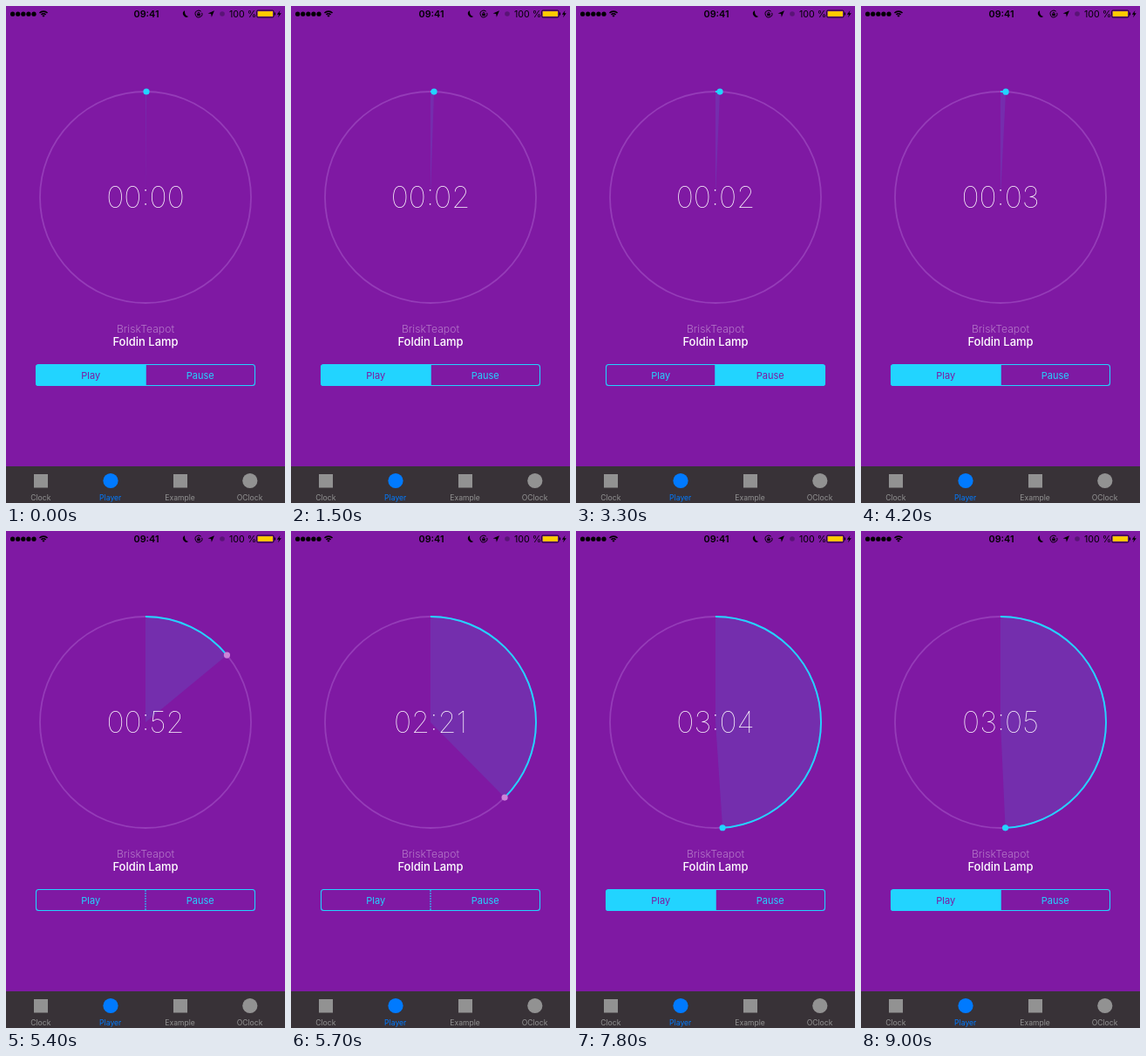
Animation of 320 by 569 pixels, one loop 9.1 s. Source, as an HTML page with a canvas:

```html
<!DOCTYPE html>
<html lang="en">
<head>
<meta charset="utf-8">
<title>Player</title>
<style>
html, body { margin: 0; width: 100%; height: 100%; overflow: hidden; background: #7f19a3; }
canvas { display: block; width: 320px; height: 569px; }
</style>
</head>
<body>
<canvas id="stage"></canvas>
<script>
const W = 320, H = 569, LOOP = 9.1;
const CX = 160, CY = 219, R = 121, TRACK = 376;
const BG = '#7f19a3', CYAN = '#22d4ff', GREY = '#929292', BLUE = '#007aff';
const FONT = 'Inter, Roboto, sans-serif';

const canvas = document.getElementById('stage');
const dpr = window.devicePixelRatio || 1;
canvas.width = Math.round(W * dpr);
canvas.height = Math.round(H * dpr);
const c = canvas.getContext('2d');
c.scale(dpr, dpr);

const clamp = x => Math.max(0, Math.min(1, x));
const ramp = (t, a, b) => clamp((t - a) / (b - a));
const ease = u => u * u * (3 - 2 * u);
const mix = (a, b, u) => a + (b - a) * u;

// The player reports its position four times a second.
const tick = t => Math.floor((t + 0.05) * 4 + 1e-6) / 4;

function position(t) {
  if (t < 2.15) return Math.min(0.5 + tick(t), 2.5);
  if (t < 5.1) return Math.max(2.5, tick(t) - 1.25);
  if (t < 5.97) return mix(3.75, 182.25, ease(ramp(t, 5.1, 5.97)));
  return tick(t) + 176.25;
}

function selection(t) {
  const paused = ramp(t, 1.95, 2.35) - ramp(t, 3.55, 3.95);
  const idle = ramp(t, 4.95, 5.35) - ramp(t, 5.95, 6.3);
  return { play: clamp(1 - paused - idle), pause: clamp(paused) };
}

function text(str, x, y, size, color, weight = 400, align = 'center') {
  c.font = `${weight} ${size}px ${FONT}`;
  c.textAlign = align;
  c.fillStyle = color;
  c.fillText(str, x, y);
}

function disc(x, y, r, color) {
  c.fillStyle = color;
  c.beginPath();
  c.arc(x, y, r, 0, Math.PI * 2);
  c.fill();
}

function arc(x, y, r, from, to, color, width) {
  c.strokeStyle = color;
  c.lineWidth = width;
  c.beginPath();
  c.arc(x, y, r, from, to);
  c.stroke();
}

function poly(color, ...p) {
  c.fillStyle = color;
  c.beginPath();
  for (let i = 0; i < p.length; i += 2) c.lineTo(p[i], p[i + 1]);
  c.closePath();
  c.fill();
}

function box(x, y, w, h, r) {
  c.beginPath();
  c.roundRect(x, y, w, h, r);
}

function statusBar() {
  for (let i = 0; i < 5; i++) disc(7.6 + i * 6.1, 9.2, 2.6, '#000');

  for (const r of [3.6, 6.4]) arc(43, 12.5, r, -Math.PI * 0.75, -Math.PI * 0.25, '#000', 1.6);
  poly('#000', 43, 12.8, 41.4, 11, 43, 10.3, 44.6, 11);

  text('09:41', 161, 13, 10.8, '#000', 600);

  // Moon
  c.fillStyle = '#000';
  c.beginPath();
  c.arc(207, 8.7, 4, 1, 4.2);
  c.quadraticCurveTo(204.5, 11, 209.2, 12.1);
  c.fill();

  // Rotation lock
  arc(221, 9, 3.9, -0.3, Math.PI * 1.75, '#000', 1);
  c.fillStyle = '#000';
  c.fillRect(219.2, 8.6, 3.6, 2.6);
  arc(221, 8.5, 1.2, Math.PI, 0, '#000', 0.8);

  poly('#000', 239, 5.3, 235.8, 12.8, 235.2, 9.1, 231.6, 8.6);
  disc(248, 9, 2.8, '#591476');
  text('100 %', 256, 13, 10.6, '#000', 400, 'left');

  // Battery
  c.fillStyle = '#ffcc00';
  c.fillRect(288.7, 6.1, 17.3, 5.8);
  c.strokeStyle = '#000';
  c.lineWidth = 0.8;
  box(287.6, 5, 19.5, 8, 1.5);
  c.stroke();
  c.fillStyle = '#000';
  c.fillRect(308, 7.5, 1, 3);
  poly('#000', 314.5, 5, 310.8, 9.8, 313, 9.8, 312, 13.2, 315.8, 8.2, 313.5, 8.2);
}

function dial(t) {
  const pos = position(t);
  const start = -Math.PI / 2;
  const end = start + pos / TRACK * Math.PI * 2;

  arc(CX, CY, R, 0, Math.PI * 2, '#953cb8', 1.8);

  c.fillStyle = 'rgba(34,212,255,0.11)';
  c.beginPath();
  c.moveTo(CX, CY);
  c.arc(CX, CY, R, start, end);
  c.fill();
  arc(CX, CY, R, start, end, CYAN, 1.9);

  const held = t >= 5 && t < 6.05;
  disc(CX + R * Math.cos(end), CY + R * Math.sin(end), 3.6, held ? '#cb83d8' : CYAN);

  const two = n => String(Math.floor(n)).padStart(2, '0');
  text(two(pos / 60) + ':' + two(pos % 60), CX, 231, 34, '#fff', 100);
}

function segment(label, x, w, radii, on) {
  c.globalAlpha = on;
  c.fillStyle = CYAN;
  box(x, 410.5, w, 24.5, radii);
  c.fill();
  c.globalAlpha = 1;
  const mid = x + w / 2;
  text(label, mid, 426.8, 11, CYAN);
  c.globalAlpha = on;
  text(label, mid, 426.8, 11, BG);
  c.globalAlpha = 1;
}

function controls(t) {
  const { play, pause } = selection(t);
  segment('Play', 34, 126.5, [3, 0, 0, 3], play);
  segment('Pause', 159.5, 126.5, [0, 3, 3, 0], pause);
  c.strokeStyle = CYAN;
  c.lineWidth = 1.1;
  box(34.5, 410.5, 251, 24, 3);
  c.stroke();
  c.setLineDash(play + pause < 0.1 ? [2, 1] : []);
  c.beginPath();
  c.moveTo(160, 411);
  c.lineTo(160, 434);
  c.stroke();
  c.setLineDash([]);
}

function tabBar() {
  c.fillStyle = '#383237';
  c.fillRect(0, 527, W, 42);
  ['Clock', 'Player', 'Example', 'OClock'].forEach((name, i) => {
    const x = 39.8 + i * 79.9;
    const color = i === 1 ? BLUE : GREY;
    if (i % 2) {
      disc(x + 0.3, 543.5, 8.6, color);
    } else {
      c.fillStyle = color;
      c.fillRect(Math.round(x - 8), 536, 16, 15.5);
    }
    text(name, x, 566, 8.6, color);
  });
}

function draw(now) {
  const t = (now / 1000) % LOOP;
  c.fillStyle = BG;
  c.fillRect(0, 0, W, H);
  statusBar();
  dial(t);
  text('BriskTeapot', 160, 373.6, 12.2, '#b477c8', 300);
  text('Foldin Lamp', 160, 389, 13, '#fff', 500);
  controls(t);
  tabBar();
}

let origin;
function loop(now) {
  origin ??= now;
  draw(Math.max(0, now - origin));
  requestAnimationFrame(loop);
}
draw(0);
requestAnimationFrame(loop);
</script>
</body>
</html>
```
